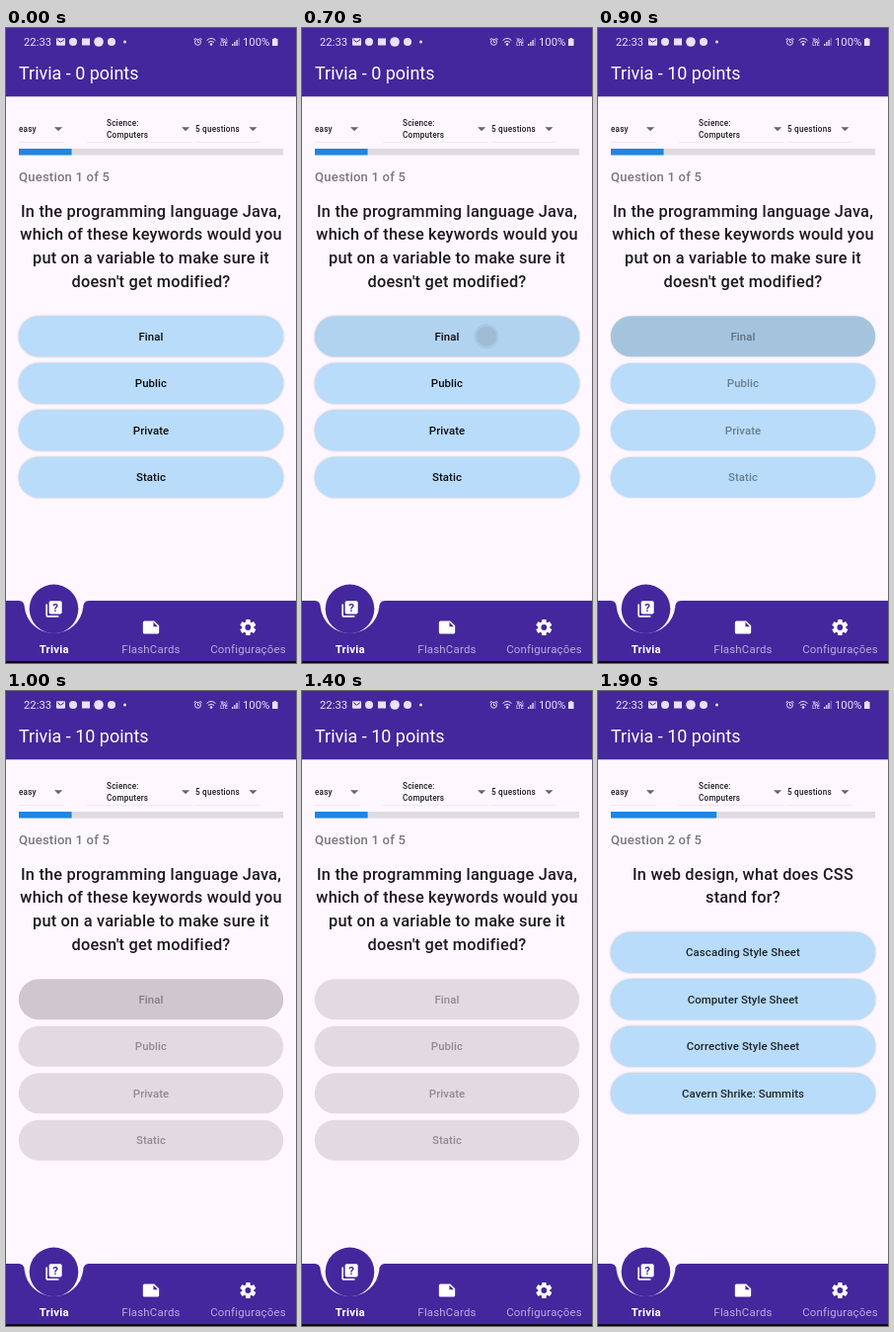
These frames come from a looping animation (294x642 px, 2 s). An HTML page:

```html
<!DOCTYPE html>
<html lang="en">
<head>
<meta charset="utf-8">
<title>Trivia</title>
<style>
html, body { margin: 0; height: 100%; overflow: hidden; background: #fef7ff; }
svg { display: block; width: 100vw; height: 100vh; font-family: Roboto, sans-serif; }
.mid { text-anchor: middle; }
.medium { font-weight: 500; letter-spacing: .204px; }
.small { font-size: 8.17px; fill: #1d1b20; }
.question { font-size: 16.33px; fill: #1d1b20; }
.tab { font-size: 11.43px; letter-spacing: .204px; fill: #b9abdf; }
.answer text { font-size: 11.43px; font-weight: 500; letter-spacing: .08px; fill: #0c0c10; }
</style>
</head>
<body>
<svg viewBox="0 0 294 642">
  <rect width="294" height="642" fill="#fef7ff"/>
  <rect width="294" height="69.3" fill="#44279c"/>

  <g fill="#e9e2f7" font-size="11.3">
    <text x="18" y="18">22:33</text>
    <rect x="51" y="10.3" width="9" height="7.4" rx="1"/>
    <path d="M52 11.7l3.5 2.5 3.5-2.5" fill="none" stroke="#44279c"/>
    <circle cx="68" cy="14" r="4"/>
    <rect x="77" y="10.5" width="8" height="7"/>
    <circle cx="94" cy="14" r="4.8"/>
    <circle cx="107" cy="14" r="4"/>
    <circle cx="120.5" cy="14" r="1.5"/>
    <g fill="none" stroke="#e9e2f7">
      <circle cx="194.5" cy="14.3" r="3"/>
      <path d="M194.5 12.5v2h1.5M190.5 12l2-2M198.500 12l-2-2"/>
      <path d="M203.500 12.500q4.500-4 9 0M205 14.500q3-2.500 6 0"/>
    </g>
    <circle cx="208" cy="16.500" r="1.300"/>
    <text class="mid" x="221" y="13.500" font-size="4.500" font-weight="700">Vo)</text>
    <text class="mid" x="221" y="18" font-size="4.500" font-weight="700">LTE</text>
    <path d="M229 18v-2h1.300v2zm2.200 0v-4h1.300v4zm2.200 0v-6h1.300v6z"/>
    <path d="M235.600 18v-8h1v8z" opacity=".5"/>
    <text x="240" y="18">100%</text>
    <path d="M270 11h1.500v-1h2.500v1h1.500v7h-5.500z"/>
  </g>
  <text id="title" x="13" y="52.300" font-size="17.970" fill="#fff"></text>

  <path d="M13 115.500h46M82 115.500h107M192 115.500h66" stroke="#f0e9f2"/>
  <g class="medium small">
    <text x="13" y="105">easy</text>
    <text x="102" y="99">Science:</text>
    <text x="102" y="111">Computers</text>
    <text x="192" y="105">5 questions</text>
  </g>
  <path d="M49 100.200h8.200l-4.100 4.100zm129 0h8.200l-4.100 4.100zm68.300 0h8.200l-4.100 4.100z" fill="#68646b"/>
  <rect x="13" y="122" width="268" height="6.500" fill="#dddbe1"/>
  <rect id="bar" x="13" y="122" height="6.500" fill="#2085e2"/>
  <text id="count" class="medium" x="13" y="155.400" font-size="13.070" fill="#7b777e"></text>
  <g id="page"></g>

  <path d="M0 579H13Q18.500 579 18.700 585.500A30 30 0 0 0 78.300 585.500Q78.500 579 84 579H294V642H0Z" fill="#44279c"/>
  <rect y="640.200" width="294" height="1.800" fill="#08060c"/>
  <circle cx="48.500" cy="587.300" r="24.800" fill="#44279c"/>
  <g fill="#fff">
    <g transform="translate(38.700 577.700) scale(.8167)">
      <path d="M4 6H2v14q0 2 2 2h14v-2H4z"/>
      <rect x="6" y="2" width="16" height="16" rx="2"/>
      <text class="mid" x="14" y="15" font-size="14" font-weight="700" fill="#44279c">?</text>
    </g>
    <path transform="translate(137.200 596.200) scale(.8167)" fill-rule="evenodd"
      d="M22 10l-6-6H4q-2 0-2 2v12q0 2 2 2h16q2 0 2-2zM15 5.500l5.500 5.500H15z"/>
    <g id="gear" transform="translate(245.300 606)">
      <circle r="6.100"/>
    </g>
    <circle cx="245.300" cy="606" r="2.900" fill="#44279c"/>
  </g>
  <g class="tab mid">
    <text x="48.700" y="632" font-weight="700" style="fill:#fff">Trivia</text>
    <text x="147" y="632">FlashCards</text>
    <text x="245.500" y="632">Configurações</text>
  </g>
</svg>
<script>
const quiz = [
  {
    lines: ["In the programming language Java,", "which of these keywords would you",
            "put on a variable to make sure it", "doesn't get modified?"],
    answers: ["Final", "Public", "Private", "Static"]
  },
  {
    lines: ["In web design, what does CSS", "stand for?"],
    answers: ["Cascading Style Sheet", "Computer Style Sheet",
              "Corrective Style Sheet", "Cavern Shrike: Summits"]
  }
];
const STEP = 100, LOOP = 2000;
const $ = id => document.getElementById(id);

for (const a of [0, 60, 120])
  $("gear").innerHTML += `<rect x="-2.3" y="-8.1" width="4.6" height="16.2" rx=".6" transform="rotate(${a})"/>`;

const pill = (y, fill, extra = "") =>
  `<rect x="12.8" y="${y - 20.5}" width="268.4" height="41" rx="20.5" fill="${fill}" ${extra}/>`;

// text fades out after the tap and back in with the next question
const textAlpha = s => s < 8 ? 1 : { 8: .8, 9: .45, 18: .62, 19: .88 }[s] ?? .38;
const pressAlpha = s => ({ 7: .04, 8: .08, 9: .11, 10: .085, 11: .035 })[s] ?? 0;

function draw(s) {
  const n = s < 18 ? 0 : 1, { lines, answers } = quiz[n];
  const off = s >= 10 && s < 18;
  const shade = off ? 0 : s === 9 ? .12 : .24;
  $("title").textContent = `Trivia - ${s < 8 ? 0 : 10} points`;
  $("count").textContent = `Question ${n + 1} of 5`;
  $("bar").setAttribute("width", 53.6 * (n + 1));

  let out = lines.map((line, i) =>
    `<text class="question medium mid" x="147" y="${190.7 + 23.75 * i}">${line}</text>`).join("");
  answers.forEach((label, i) => {
    const y = 216.8 + 23.75 * lines.length + 47.5 * i;
    out += `<g class="answer mid">` +
      pill(y, off ? "#e2d9e3" : "#b8dcf9", `style="filter:drop-shadow(0 .8px .8px rgba(0,0,0,${shade}))"`);
    if (i === 0) out += pill(y, "#000", `opacity="${pressAlpha(s)}"`);
    if (i === 0 && s === 7)
      out += `<circle cx="187" cy="${y}" r="12.5" opacity=".05"/><circle cx="187" cy="${y}" r="10" opacity=".06"/>`;
    out += `<text x="147" y="${y + 4.1}" opacity="${textAlpha(s)}">${label}</text></g>`;
  });
  $("page").innerHTML = out;
}

let start, last = -1;
function tick(now) {
  start ??= now;
  const s = Math.floor((now - start) % LOOP / STEP);
  if (s !== last) draw(last = s);
  requestAnimationFrame(tick);
}
draw(0);
requestAnimationFrame(tick);
</script>
</body>
</html>
```
